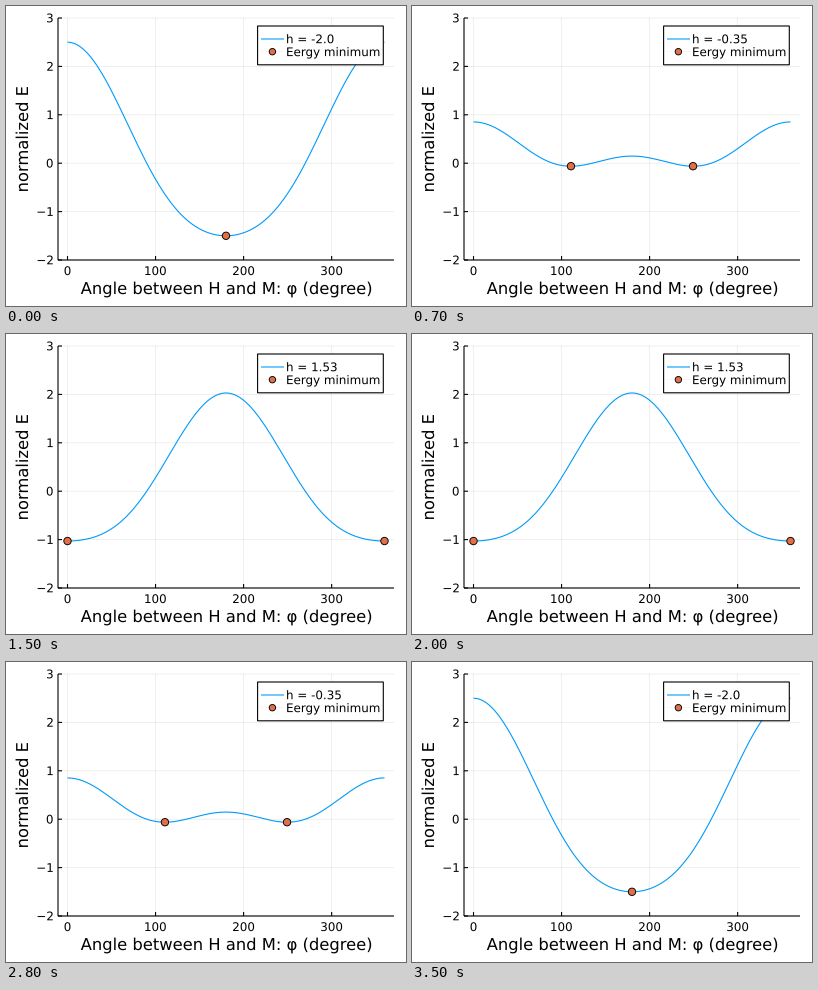
Write a matplotlib script that moves like this. It is 400x300 px and loops after 3.6 s.

```python
import numpy as np
import matplotlib.pyplot as plt
from matplotlib.animation import FuncAnimation
from matplotlib.patches import Circle, PathPatch, Rectangle
from matplotlib.textpath import TextPath
from matplotlib.transforms import Affine2D

W, H, DPI = 400, 300, 100
PT = 72 / DPI  # points per pixel
BLUE, ORANGE = "#009afa", "#e36f47"
SMALL, LARGE = 11.9, 16.35
LEFT, RIGHT, TOP, BOTTOM = 52, 388, 12, 254
LINE, GRID, TICK = 1.1, 0.6, 4
STEPS = 18

# One axes over the whole stage, in pixels from the top left
fig = plt.figure(figsize=(W / DPI, H / DPI), dpi=DPI, facecolor="white")
ax = fig.add_axes([0, 0, 1, 1], xlim=(0, W), ylim=(H, 0))
ax.axis("off")


def px(phi):
    return LEFT + (phi + 10.8) / 381.6 * (RIGHT - LEFT)


def py(e):
    return TOP + (3 - e) / 5 * (BOTTOM - TOP)


def line(x, y, color="black", lw=LINE, z=2, **kw):
    return ax.plot(x, y, color=color, lw=lw * PT, zorder=z, snap=False,
                   solid_capstyle="butt", **kw)[0]


def dot(x, y, r, z):
    return ax.add_patch(Circle((x, y), r, fc=ORANGE, ec="black",
                               lw=0.9 * PT, zorder=z))


def glyphs(x, y, text, size=SMALL, align=None, angle=0):
    """Outline of text with its baseline at (x, y)."""
    path = TextPath((0, 0), text, size=size, prop={"family": "DejaVu Sans"})
    box = path.get_extents()
    shift = {"center": (box.x0 + box.x1) / 2, "right": box.x1}.get(align, 0)
    move = Affine2D().translate(-shift, 0).scale(1, -1)
    return move.rotate_deg(-angle).translate(x, y).transform_path(path)


def put(*args, **kw):
    return ax.add_patch(PathPatch(glyphs(*args, **kw), fc="black", lw=0,
                                  zorder=12, snap=False))


# Axes, grid and labels
for v in range(0, 301, 100):
    x = px(v)
    line([x, x], [TOP, BOTTOM], lw=GRID, z=1, alpha=0.1)
    line([x, x], [BOTTOM - TICK, BOTTOM])
    put(x, 269, str(v), align="center")
for v in range(-2, 4):
    y = py(v)
    line([LEFT, RIGHT], [y, y], lw=GRID, z=1, alpha=0.1)
    line([LEFT, LEFT + TICK], [y, y])
    put(46.7, y + 4.3, str(v).replace("-", "\u2212"), align="right")
line([LEFT, LEFT], [TOP, BOTTOM])
line([LEFT, RIGHT], [BOTTOM, BOTTOM])
put(220, 288, "Angle between H and M: φ (degree)", LARGE, align="center")
put(22, 133, "normalized E", LARGE, align="center", angle=90)

# Legend
ax.add_patch(Rectangle((251.6, 20), 125.7, 38.8, fc="white", ec="black",
                       lw=LINE * PT, zorder=10, snap=False))
line([255, 278], [33, 33], BLUE, z=11)
line([255, 278], [45.7, 45.7], ORANGE, lw=GRID, z=11, alpha=0.15)
dot(266.4, 45.7, 3.2, 11)
label = put(280, 37.2, "h")
put(280, 50.1, "Eergy minimum")

# Energy curve and its minima
phi = np.arange(361)
cos_phi = np.cos(np.radians(phi))
curve = line([], [], BLUE, z=3)
dots = [dot(0, 0, 3.7, 4) for _ in range(2)]


def energy(c, h):
    return c * c / 2 - h * c


def draw(i):
    k = min(i, 2 * STEPS - 1 - i)
    h = -2 + 4 * k / (STEPS - 1)
    curve.set_data(px(phi), py(energy(cos_phi, h)))
    c = np.clip(h, -1, 1)
    a = np.degrees(np.arccos(c))
    for spot, angle in zip(dots, (a, 360 - a)):
        spot.center = px(angle), py(energy(c, h))
    dots[1].set_visible(c > -1)
    label.set_path(glyphs(280, 37.2, f"h = {round(h, 2)}"))
    return curve, label, *dots


anim = FuncAnimation(fig, draw, frames=2 * STEPS, interval=100,
                     repeat=True, repeat_delay=0, blit=False)
plt.show()
```
